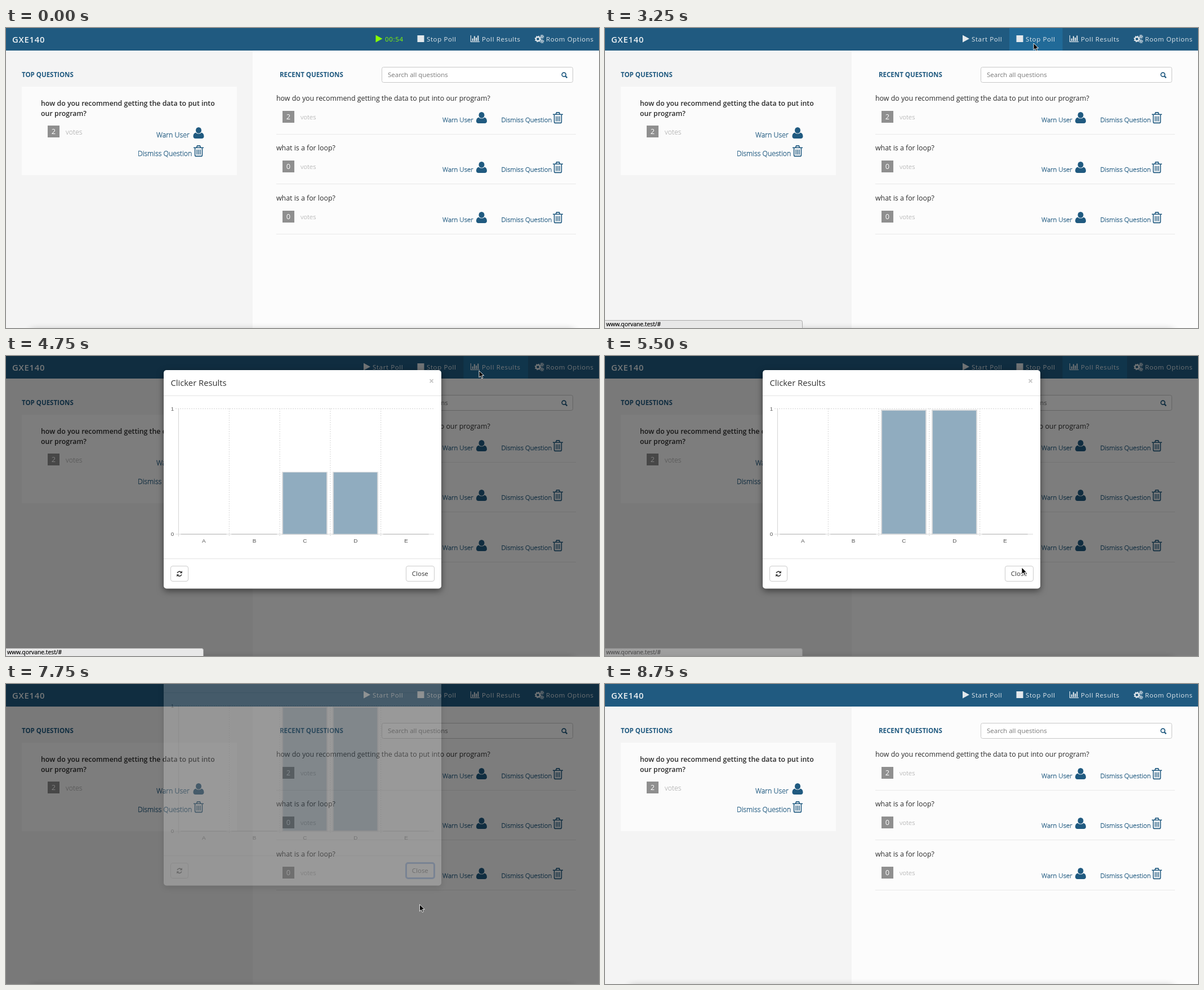
These frames come from a looping animation (1053x532 px, 9250 ms). An HTML page:

```html
<!DOCTYPE html>
<html lang="en">
<head>
<meta charset="utf-8">
<title>Classroom poll</title>
<style>
  html, body { margin: 0; width: 100%; height: 100%; overflow: hidden; background: #fcfcfc; }
  svg { display: block; width: 1053px; height: 532px; font: 11.5px "Open Sans", sans-serif; }
  .nav { fill: #e2e8ec; letter-spacing: .62px; }
  .brand { font-size: 14.8px; font-weight: 600; letter-spacing: .8px; fill: #eef2f4; }
  .lime { fill: #8f0; letter-spacing: .7px; }
  .head { font-weight: 700; fill: #205a80; }
  .question { font-size: 12.36px; fill: #2b2b2b; }
  .strong { font-weight: 600; }
  .light { font-weight: 300; fill: #999; }
  .link { font-weight: 300; fill: #205a80; stroke: #205a80; stroke-width: .3px; }
  .large { font-size: 12.33px; }
  .digit { font-size: 12.8px; fill: #fff; text-anchor: middle; }
  .hint { fill: #777; }
  .title { font-size: 14.8px; fill: #333; }
  .axis { font: 9.9px "Liberation Sans", Arial, sans-serif; fill: #555; text-anchor: middle; }
  .status { font-size: 10.3px; fill: #000; stroke: #000; stroke-width: .2px; }
</style>
</head>
<body>
<svg viewBox="0 0 1053 532">
  <defs>
    <symbol id="user" overflow="visible" fill="#205a80">
      <ellipse cx="9.5" cy="5.4" rx="5" ry="5.4"/>
      <path d="M4.4 9.4C1.2 10.2 0 13 0 16.3 0 18.6 1.6 20 3.8 20H15.2C17.4 20 19 18.6 19 16.3 19 13 17.8 10.2 14.6 9.4 11.6 12.3 7.4 12.3 4.4 9.4Z"/>
    </symbol>
    <symbol id="trash" overflow="visible" fill="none" stroke="#205a80" stroke-width="1.6">
      <path d="M0 4.2H18M5.4 4 6.6.9H11.4L12.6 4M2.6 4.2V17.4Q2.6 19.4 4.6 19.4H13.4Q15.4 19.4 15.4 17.4V4.2"/>
      <path d="M6.1 7.4V16.4M9 7.4V16.4M11.9 7.4V16.4" stroke-width="1.4"/>
    </symbol>
    <symbol id="play" overflow="visible"><path d="M0 0 12 6.5 0 13Z"/></symbol>
    <filter id="soft" x="-10%" y="-30" width="120%" height="60" filterUnits="userSpaceOnUse"><feGaussianBlur stdDeviation="7"/></filter>
  </defs>
  <g id="page"></g>
  <rect id="backdrop" width="1053" height="532"/>
  <g id="modal"></g>
  <g id="status">
    <path d="M-1 518.5H347.5Q350.5 518.5 350.5 521.5V533H-1Z" fill="#e8e8e8" stroke="#aaa"/>
    <text class="status" x="2" y="528.5">www.qorvane.test/#</text>
  </g>
  <path id="cursor" d="M0 0V12L2.8 9.4 4.8 13.8 6.8 12.9 4.9 8.7H8.8Z" stroke="#fff" stroke-width=".9"/>
</svg>
<script>
const LOOP = 9250, STEP = 250;
const $ = id => document.getElementById(id);
const text = (x, y, cls, s) => `<text x="${x}" y="${y}" class="${cls}">${s}</text>`;
const rect = (x, y, w, h, fill, more = '') =>
  `<rect x="${x}" y="${y}" width="${w}" height="${h}" fill="${fill}" ${more}/>`;
const path = (d, stroke, more = '') => `<path d="${d}" fill="none" stroke="${stroke}" ${more}/>`;
const icon = (id, x, y, more = '') => `<use href="#${id}" x="${x}" y="${y}" ${more}/>`;
const badge = (x, y, n) => rect(x, y, 21, 21, '#8f8f8f') + text(x + 10.5, y + 15, 'digit', n);

function cog(x, y, r) {
  const teeth = 2 * Math.PI * (r + .8) / 16;
  return `<g fill="none" stroke="#e2e8ec" transform="translate(${x} ${y})">
    <circle r="${r - .6}" stroke-width="${r * .55}"/>
    <circle r="${r + .8}" stroke-width="1.6" stroke-dasharray="${teeth}"/></g>`;
}

function row(y, question, votes) {
  return text(480, y, 'question', question) + badge(491, y + 18, votes) +
    text(523, y + 33, 'light', 'votes') +
    text(775, y + 38, 'link', 'Warn User') + icon('user', 835, y + 20) +
    text(879.5, y + 38, 'link', 'Dismiss Question') + icon('trash', 971, y + 20) +
    path(`M480 ${y + 59.5}H1012`, '#e8e8e8');
}

$('page').innerHTML =
  rect(0, 0, 438, 532, '#f4f4f4') +
  `<g transform="translate(0 537)">${rect(45, 0, 963, 12, '#000', 'opacity=".4" filter="url(#soft)"')}</g>` +
  rect(0, 0, 1053, 40, '#205a80') +
  rect(0, 0, 0, 40, '#216a98', 'id="hover"') +
  text(11, 25.5, 'brand', 'GXE140') +
  `<g id="running">${icon('play', 656.5, 12.5, 'fill="#8f0"')}
    <text id="clock" class="lime" x="673" y="24"></text></g>` +
  `<g id="idle">${icon('play', 635, 12.5, 'fill="#e2e8ec"') + text(651, 24, 'nav', 'Start Poll')}</g>` +
  rect(730.5, 13, 12, 12, '#e2e8ec') + text(747, 24, 'nav', 'Stop Poll') +
  path('M825.4 13V24.4H841', '#e2e8ec', 'stroke-width="1.2"') +
  path('M828.7 23V18.5M831.9 23V14.5M835.1 23V17M838.3 23V13.5', '#e2e8ec', 'stroke-width="2"') +
  text(845, 24, 'nav', 'Poll Results') +
  cog(944.5, 19.5, 4.1) + cog(951.8, 15.3, 2) + cog(951.8, 23.6, 2) +
  text(959, 24, 'nav', 'Room Options') +

  text(28, 87, 'head', 'TOP QUESTIONS') +
  rect(28, 104, 382, 157, '#fbfbfb') +
  text(62, 138, 'question strong', 'how do you recommend getting the data to put into') +
  text(62, 155.5, 'question strong', 'our program?') +
  badge(74, 173, 2) + text(106, 188.5, 'light large', 'votes') +
  text(267, 194, 'link large', 'Warn User') + icon('user', 332.5, 176) +
  text(234, 226.5, 'link large', 'Dismiss Question') + icon('trash', 333, 208) +

  text(486, 87, 'head', 'RECENT QUESTIONS') +
  rect(667.5, 69.5, 339, 27, '#fff', 'rx="3" stroke="#c8c8c8"') +
  text(678, 87, 'hint', 'Search all questions') +
  '<circle cx="990.7" cy="82.7" r="3.5" fill="none" stroke="#205a80" stroke-width="1.7"/>' +
  path('M993.3 85.3 996.4 88.4', '#205a80', 'stroke-width="2.2"') +
  row(129, 'how do you recommend getting the data to put into our program?', 2) +
  row(217, 'what is a for loop?', 0) +
  row(306, 'what is a for loop?', 0);

const columns = [...'ABCDE'].map((name, i) => {
  const x = 306.5 + i * 89.8;
  return path(`M${x} 93V320`, '#d4d4d4', i ? 'stroke-dasharray="2 2"' : '') +
    path(`M${x + 4} 316H${x + 85}`, '#bbb') + text(x + 44.8, 331, 'axis', name);
}).join('');
const bar = x => rect(x, 96, 79, 220, '#90acbf', 'stroke="#d8dadc" stroke-width="2"');

$('modal').innerHTML =
  `<g style="filter:drop-shadow(0 4px 6px rgba(0,0,0,.5))">${rect(280, 25, 493, 387.5, '#fff', 'rx="5"')}</g>` +
  text(292.5, 52.5, 'title', 'Clicker Results') +
  '<text x="755.5" y="49.5" text-anchor="middle" font-size="16" font-weight="700" fill="#c4c4c4">×</text>' +
  path('M280 70.5H773M280 359.5H773', '#e3e3e3') +
  path('M301 93.5H760', '#d4d4d4', 'stroke-dasharray="2 2"') +
  path('M301 316H760', '#d8d8d8') + columns +
  `<g id="bars">${bar(491) + bar(581)}</g>` +
  text(295.5, 97, 'axis', 1) + text(295.5, 319, 'axis', 0) +
  rect(292.5, 372.5, 31, 27, '#fff', 'rx="3.5" stroke="#ccc"') +
  path('M304.2 385A4 4 0 0 1 311 383.4M311.8 387.4A4 4 0 0 1 305 389', '#333', 'stroke-width="1.6"') +
  '<path d="M312.8 381V385.2H308.6ZM303.2 391.4V387.2H307.4Z" fill="#333"/>' +
  rect(710.5, 372.5, 50, 27, '#fff', 'id="close" rx="3.5" stroke="#ccc"') +
  '<text x="735.3" y="390.3" text-anchor="middle" fill="#333">Close</text>';

// Linear interpolation through [time, ...values] keys.
function at(t, keys) {
  const next = keys.findIndex(k => k[0] > t);
  if (next < 1) return keys.at(next).slice(1);
  const a = keys[next - 1], b = keys[next], p = (t - a[0]) / (b[0] - a[0]);
  return a.slice(1).map((v, i) => v + (b[i + 1] - v) * p);
}

const cursorKeys = [[750, 851, 1], [1250, 790, 16], [1750, 757, 26], [2250, 757, 26], [2500, 761, 27],
  [3500, 761, 27], [4000, 832, 28], [4250, 840, 26], [4750, 840, 26], [5500, 740, 375],
  [6000, 742, 387], [6500, 734.5, 391], [7750, 734.5, 391], [8250, 985, 20]];
const backdropKeys = [[3750, 0], [4250, .48], [4500, .5], [7750, .5], [8250, 0]];
const modalKeys = [[4250, 0, -110], [4500, .6, -40], [4750, 1, 0], [7500, 1, 0], [7750, .22, -55], [8000, 0, -110]];
const barKeys = [[4500, 0], [5000, 1]];
const statusKeys = [[2250, 0], [2750, 1], [5000, 1], [5500, .35], [5750, 0], [8000, 0], [8250, .8], [8750, 0]];

const show = (id, on) => $(id).setAttribute('visibility', on ? 'visible' : 'hidden');
const set = (id, attrs) => {
  for (const name in attrs) $(id).setAttribute(name, attrs[name]);
};

function draw(now) {
  const t = Math.floor(now % LOOP / STEP) * STEP;
  const running = t < 2500;
  show('running', running);
  show('idle', !running);
  $('clock').textContent = '00:' + (54 + Math.floor((t + 750) / 1000));

  show('hover', t >= 2250 && t < 7500);
  set('hover', t < 4000 ? { x: 718, width: 94.5 } : { x: 812.5, width: 114.5 });

  const [x, y] = at(t, cursorKeys);
  show('cursor', t >= 750 && t < 8500);
  set('cursor', { transform: `translate(${x} ${y})` });

  set('backdrop', { opacity: at(t, backdropKeys)[0] });
  const [opacity, shift] = at(t, modalKeys);
  set('modal', { opacity, transform: `translate(0 ${shift})` });
  const grow = at(t, barKeys)[0];
  set('bars', { transform: `translate(0 ${316 * (1 - grow)}) scale(1 ${grow})` });
  set('close', t < 7500 ? { stroke: '#ccc', 'stroke-width': 1 } : { stroke: '#6f9ce0', 'stroke-width': 3 });
  set('status', { opacity: at(t, statusKeys)[0] });
  requestAnimationFrame(draw);
}
requestAnimationFrame(draw);
</script>
</body>
</html>
```
